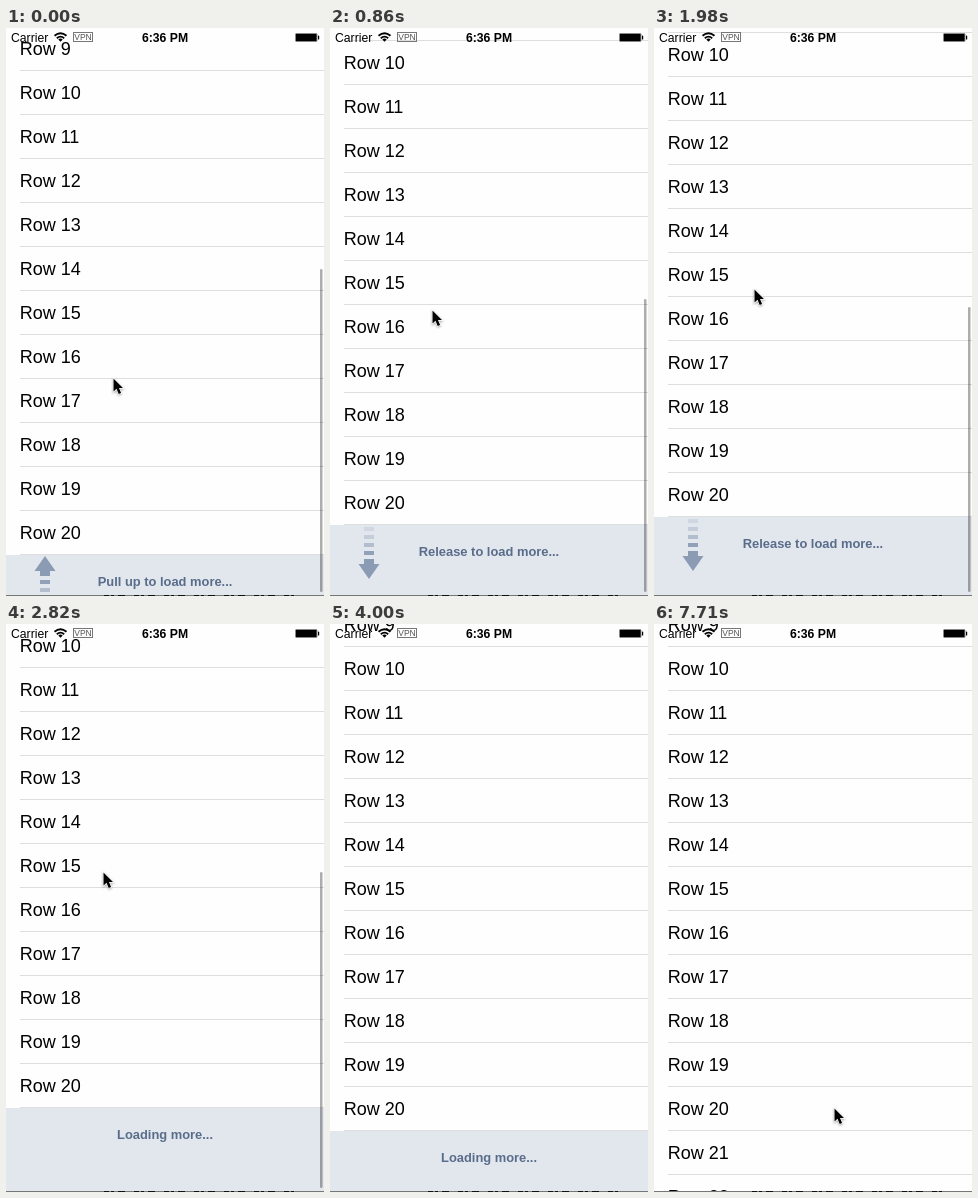
Animation, 318 px wide and 568 px high, one loop 8 s. Source, as an HTML page:

```html
<!DOCTYPE html>
<html lang="en">
<head>
<meta charset="utf-8">
<title>Pull up to load more</title>
<style>
  html, body { margin: 0; width: 100%; height: 100%; overflow: hidden; background: #fff; }
  svg { display: block; width: 318px; height: 568px; }
  text { font-family: "Liberation Sans", Arial, sans-serif; }
  .row text { font-size: 18px; }
  .row rect { fill: #dededf; }
  #label { font-size: 12.9px; font-weight: bold; fill: #596d8b; text-anchor: middle; }
  #status { font-size: 12.2px; }
</style>
</head>
<body>
<svg viewBox="0 0 318 568">
  <rect width="318" height="568" fill="#fefefe"/>
  <g id="list"></g>

  <g id="footer">
    <rect width="318" height="150" fill="#e2e6ed"/>
    <g id="arrow" fill="#8b9bb3">
      <path d="M39 1L49.5 16H44V21H34V16H28.5Z"/>
    </g>
    <text id="label" x="159" y="31"></text>
  </g>

  <rect id="bar" x="314" width="2.5" rx="1.2" fill="#000" fill-opacity=".32"/>

  <g id="status">
    <text x="5" y="13.5">Carrier</text>
    <g fill="none" stroke="#000" stroke-width="1.8">
      <path d="M48.5 7.8Q54.5 2.6 60.5 7.8"/>
      <path d="M50.8 10.2Q54.5 7 58.2 10.2"/>
    </g>
    <path d="M52.3 11.4Q54.5 9.6 56.7 11.4L54.5 13.8Z"/>
    <rect x="67.5" y="4.5" width="19" height="9" fill="none" stroke="#777"/>
    <text x="77" y="12.2" font-size="8.5" fill="#555" text-anchor="middle">VPN</text>
    <text x="159" y="13.5" font-weight="bold" text-anchor="middle">6:36 PM</text>
    <rect x="289.5" y="5.5" width="21.5" height="8" rx="1" stroke="#888"/>
    <rect x="312" y="7.5" width="1.2" height="4" rx=".6"/>
  </g>

  <path d="M0 567.5H318" stroke="#777"/>
  <path d="M98 567.5H290" stroke="#111" stroke-dasharray="5 2 3 4 7 9"/>

  <path id="cursor" d="M0 0V13L3 10.3L5.2 15.4L7.6 14.4L5.5 9.5H9.5Z"
    stroke="#fff" stroke-width="1.4" paint-order="stroke"
    style="filter:drop-shadow(0 1px 1px rgba(0,0,0,.35))"/>
</svg>
<script>
const LOOP = 8000, ROW = 44, FLIP = 600, RELEASE = 2820, LOADED = 5770, REST = 45;
const $ = id => document.getElementById(id);
const clamp = v => Math.max(0, Math.min(1, v));
const part = (t, from, to) => clamp((t - from) / (to - from));
const move = (el, x, y) => el.setAttribute("transform", `translate(${x} ${y})`);

const linear = p => p;
const easeIn = p => p ** 1.4;
const easeOut = p => 1 - (1 - p) ** 3;

const home = { x: 108, y: 351 };
const strokes = [
  { from: 0, to: 800, dx: -5, dy: -68, ease: easeIn },
  { from: 860, to: 1630, dx: 0, dy: -13, ease: easeIn },
  { from: 1920, to: 2320, dx: -5, dy: -21, ease: easeOut },
  { from: 3120, to: 3660, dx: 149, dy: 307, ease: easeIn },
  { from: 3900, to: 4000, dx: 31, dy: 15, ease: linear },
  { from: 6200, to: 6370, dx: -42, dy: -62, ease: easeOut },
  { from: 7100, to: 7710, dx: -55, dy: -24, ease: linear, hop: 144 }
];

function pointerAt(t) {
  let { x, y } = home;
  for (const { from, to, dx, dy, ease, hop = 0 } of strokes) {
    const p = part(t, from, to);
    x += dx * ease(p);
    y += dy * ease(p) - hop * Math.sin(Math.PI * p);
  }
  return { x, y };
}

// The list resists the drag, then springs back to rest on release
function scrollAt(t) {
  const d = home.y - pointerAt(Math.min(t, RELEASE)).y;
  const pulled = 65 - .485 * d + .0006 * d * d;
  if (t < RELEASE) return Math.round(pulled);
  const y = REST + (pulled - REST) * Math.exp((RELEASE - t) / 110);
  return Math.round(y * 2) / 2;
}

for (let n = 8; n <= 22; n++) {
  const y = (n - 10) * ROW;
  $("list").innerHTML += `<g class="row"><text x="13.7" y="${y + 6}">Row ${n}</text>` +
    `<rect x="14" y="${y + 21}" width="304" height="1"/></g>`;
}
for (let i = 0; i < 4; i++) {
  $("arrow").innerHTML +=
    `<rect x="34" y="${25 + 8 * i}" width="10" height="4" opacity="${.9 * .6 ** i}"/>`;
}

function draw(t) {
  const y = scrollAt(t), loading = t >= RELEASE;
  move($("list"), 0, y);
  move($("footer"), 0, y + 462);
  $("footer").style.display = t < LOADED ? "" : "none";
  $("label").textContent = loading ? "Loading more..."
    : t < FLIP ? "Pull up to load more..." : "Release to load more...";
  $("arrow").style.display = loading ? "none" : "";
  $("arrow").setAttribute("transform", `rotate(${180 * part(t, FLIP, FLIP + 180)} 39 27.5)`);

  const top = (loading ? 270 : 306) - y;
  $("bar").setAttribute("y", top);
  $("bar").setAttribute("height", 564 - top);
  $("bar").style.opacity = 1 - part(t, 3330, 3600);

  const tip = pointerAt(t);
  move($("cursor"), Math.round(tip.x) - .5, Math.round(tip.y) - .5);
}

const start = performance.now();
function tick() {
  draw((performance.now() - start) % LOOP);
  requestAnimationFrame(tick);
}
tick();
</script>
</body>
</html>
```
